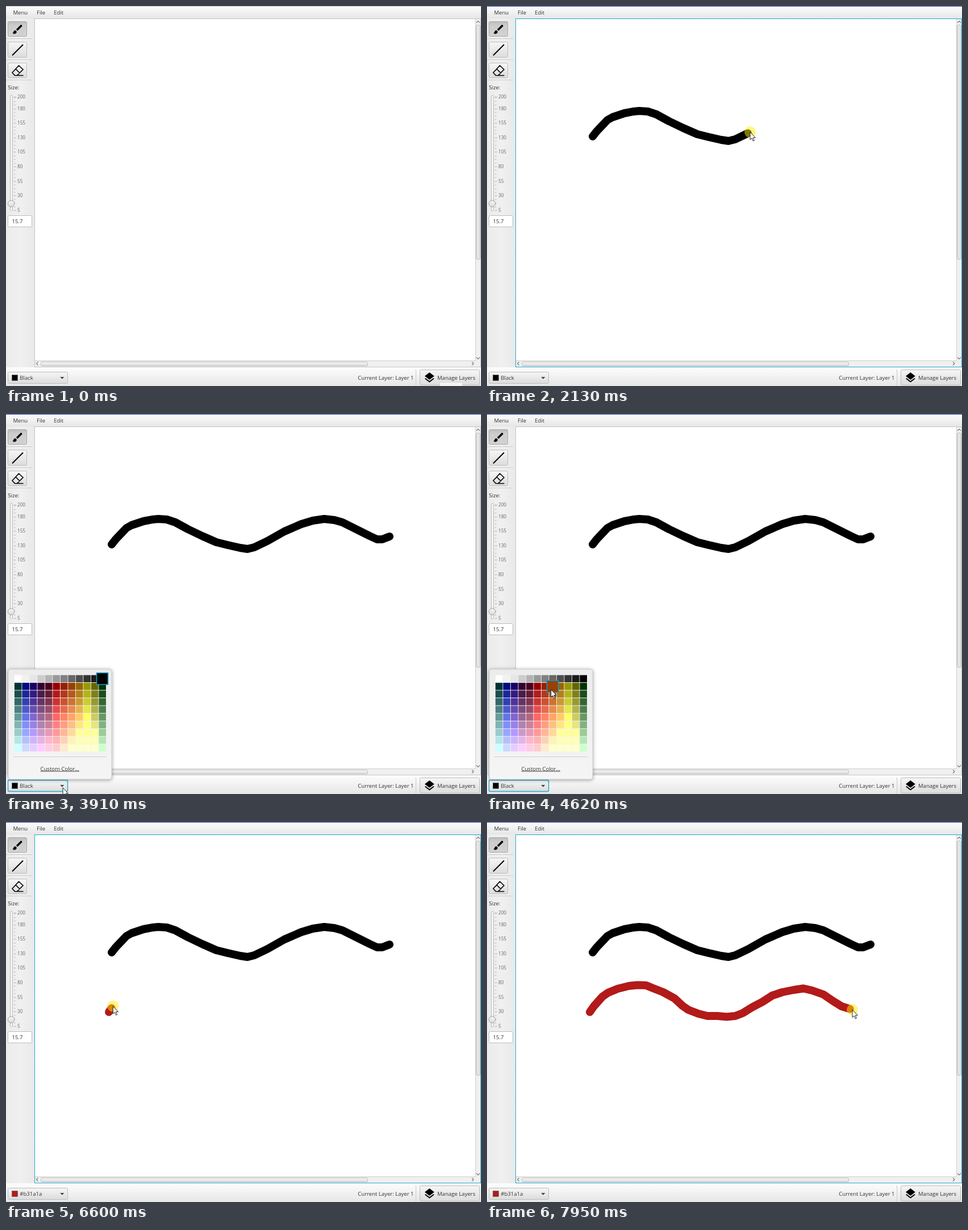
These frames come from a looping animation (836x670 px, 7.99 s). An HTML page:

```html
<!DOCTYPE html>
<html lang="en">
<head>
<meta charset="utf-8">
<title>Paint app</title>
<style>
html, body { margin: 0; width: 100%; height: 100%; overflow: hidden; background: #fff; }
svg { display: block; width: 836px; height: 670px; }
text { font: 9.55px "Open Sans", "Noto Sans", sans-serif; fill: #333; }
.tick text { font-size: 8.2px; fill: #666; }
.tick path { stroke: #b4b4b4; }
.edge { stroke: #bcbcbc; }
.line { stroke: #cdcdcd; fill: none; }
.focus { stroke: #22a9d0; fill: none; }
.arrow { fill: none; stroke: #777; stroke-width: 1.1; }
.stroke { fill: none; stroke-width: 14; stroke-linecap: round; stroke-linejoin: round; }
</style>
</head>
<body>
<svg viewBox="0 0 836 670">
  <defs>
    <linearGradient id="bar" x2="0" y2="1"><stop stop-color="#fdfdfd"/><stop offset="1" stop-color="#e6e6e6"/></linearGradient>
    <linearGradient id="side"><stop stop-color="#ebebeb"/><stop offset=".5" stop-color="#f0f0f0"/><stop offset="1" stop-color="#e9e9e9"/></linearGradient>
    <linearGradient id="btn" x2="0" y2="1"><stop stop-color="#f6f6f6"/><stop offset="1" stop-color="#dcdcdc"/></linearGradient>
    <linearGradient id="down" x2="0" y2="1"><stop stop-color="#bdbdbd"/><stop offset=".3" stop-color="#cdcdcd"/><stop offset="1" stop-color="#d2d2d2"/></linearGradient>
    <linearGradient id="pop" x2="0" y2="1"><stop stop-color="#ececec"/><stop offset="1" stop-color="#f5f5f5"/></linearGradient>
    <filter id="shadow" x="-10%" y="-10%" width="120%" height="120%"><feDropShadow dx="0" dy="1" stdDeviation="3" flood-opacity=".4"/></filter>
  </defs>

  <rect width="836" height="670" fill="#f0f0f0"/>
  <rect width="836" height="22" fill="url(#bar)"/>
  <path id="top" d="M0 .5H836"/>
  <text x="12.5" y="15.3">Menu</text><text x="54" y="15.3">File</text><text x="84.3" y="15.3">Edit</text>

  <rect y="22" width="50" height="615" fill="url(#side)"/>
  <path class="line" d="M0 57.5H46M0 94.5H46M0 130.5H46"/>
  <g class="edge" fill="url(#btn)">
    <rect x="3.5" y="27.5" width="33" height="26" rx="2" fill="url(#down)" stroke="#a8a8a8"/>
    <rect x="3.5" y="63.5" width="33" height="27" rx="2"/>
    <rect x="3.5" y="100.5" width="33" height="26" rx="2"/>
  </g>
  <path transform="translate(9.7 30.3) scale(.9)" d="M7 14c-1.66 0-3 1.34-3 3 0 1.31-1.16 2-2 2 .92 1.22 2.49 2 4 2 2.21 0 4-1.79 4-4 0-1.66-1.34-3-3-3zm13.71-9.37l-1.34-1.34c-.39-.39-1.02-.39-1.41 0L9 12.25 11.75 15l8.96-8.96c.39-.39.39-1.02 0-1.41z"/>
  <path d="M11 87L30 68" stroke="#000" stroke-width="2"/>
  <path d="M22.5 105L30 112L19.5 122.5H15.5L11 117.5ZM16.5 110.5L24.5 118.5M19 122.5H30.5" fill="none" stroke="#000" stroke-width="1.7" stroke-linejoin="round"/>

  <text x="3.3" y="147.3">Size:</text>
  <g id="scale" class="tick"></g>
  <rect x="7.5" y="157.5" width="4" height="204" rx="2" fill="#f4f4f4" class="edge"/>
  <circle cx="9" cy="348.5" r="5.7" fill="url(#btn)" stroke="#9c9c9c"/>
  <rect x="3.5" y="369.5" width="42" height="20" rx="2" fill="#fff" class="edge"/>
  <text x="10.5" y="383.3">15.7</text>

  <rect x="51" y="23" width="775" height="602" fill="#fff"/>
  <path class="line" d="M826.5 23V625.5H51"/>
  <g fill="url(#btn)" class="edge">
    <rect x="827.5" y="33.5" width="7" height="413" rx="2" fill="#e4e4e4"/>
    <rect x="61.5" y="627.5" width="575" height="7" rx="2"/>
  </g>
  <path class="arrow" d="M828 29.5l3-3 3 3M828 619.5l3 3 3-3M56.5 627.5l-3 3 3 3M820 627.5l3 3-3 3"/>
  <rect x="50.5" y="22.5" width="785" height="614" fill="none" stroke="#c4c4c4"/>
  <rect id="canvasFocus" class="focus" x="50.5" y="22.5" width="785" height="614"/>

  <path id="black" class="stroke" stroke="#000"/>
  <path id="red" class="stroke" stroke="#b31a1a"/>

  <rect y="637" width="836" height="33" fill="url(#bar)"/>
  <rect x="3.5" y="645.5" width="105" height="20" rx="2" fill="url(#btn)" class="edge"/>
  <rect id="comboFocus" class="focus" x="3.5" y="645.5" width="105" height="20" rx="2" stroke-width="1.4"/>
  <rect id="chip" x="10.5" y="650.5" width="10" height="10" stroke="#555" stroke-width=".6"/>
  <text id="label" x="24.3" y="659.2"></text>
  <path d="M95.2 654h7.2l-3.6 3.8z" fill="#444"/>
  <text x="619.3" y="659.2">Current Layer: Layer 1</text>
  <path class="line" d="M721.5 641V669"/>
  <rect x="728.5" y="641.5" width="105" height="27" rx="2" fill="url(#btn)" class="edge"/>
  <path transform="translate(734.2 644.1) scale(.93)" d="M11.99 18.54l-7.37-5.73L3 14.07l9 7 9-7-1.63-1.27zM12 16l7.36-5.73L21 9l-9-7-9 7 1.63 1.27z"/>
  <text x="759" y="659.2">Manage Layers</text>
  <rect id="tip" x="763.5" y="663.5" width="40" height="9" fill="#f4f4f4" stroke="#dadada"/>

  <g id="popup">
    <rect x="4" y="450" width="182" height="194" rx="4" fill="url(#pop)" stroke="#bbb" stroke-width=".7" filter="url(#shadow)"/>
    <g id="swatches"></g>
    <path class="line" d="M13 604.5H177"/>
    <text x="94.7" y="628.5" text-anchor="middle" text-decoration="underline">Custom Color...</text>
    <rect id="hover" width="20" height="20.5" stroke="#1496c0" stroke-width="1.6"/>
  </g>

  <circle id="brush" r="7"/>
  <circle id="press" r="10" fill="#fff000" fill-opacity=".5"/>
  <path id="cursor" d="M0 0V13.5L3 10.8L5.3 15.8L7.4 14.9L5.1 10H9.4Z" fill="#fff" stroke="#000" stroke-width=".85"/>
</svg>
<script>
const $ = id => document.getElementById(id);
const LOOP = 7990, RED = '#b31a1a';
const PRESS_1 = 1120, RELEASE_1 = 2760, OPEN = 3910, PICK = 5630, PRESS_2 = 6440;
const COL = 13.5, ROW = 13.55, LEFT = 14.5, TOP = 460;

// Slider scale
const valueY = v => Math.round(360 - (v - 5) * 1.0256) + .5;
let ticks = '';
for (let v = 5; v < 200; v += 6.25) ticks += `<path d="M14 ${valueY(v)}h2.5"/>`;
for (const v of [5, 30, 55, 80, 105, 130, 155, 180, 200])
  ticks += `<path d="M13.5 ${valueY(v)}h4.5"/><text x="20" y="${valueY(v) + 2.8}">${v}</text>`;
$('scale').innerHTML = ticks;

// Palette: a grey row, then base hues brightened row by row
const hues = [[0, 51, 51], [0, 13, 128], [26, 0, 104], [51, 0, 51], [77, 0, 26], [153, 0, 0],
  [153, 30, 0], [153, 64, 0], [153, 102, 0], [153, 153, 0], [102, 102, 0], [0, 51, 0]];
const greys = [255, 242, 230, 204, 179, 153, 128, 102, 77, 51, 26, 0];
const swatch = (c, r) => {
  const rgb = r ? hues[c].map(v => Math.min(255, Math.round(v + 25.5 * (r - 1)))) : Array(3).fill(greys[c]);
  return `rgb(${rgb})`;
};
let cells = '';
for (let r = 0; r < 10; r++)
  for (let c = 0; c < 12; c++)
    cells += `<rect x="${LEFT + c * COL + .4}" y="${TOP + r * ROW + .4}" width="12.6" height="12.6" fill="${swatch(c, r)}"/>`;
$('swatches').innerHTML = cells;

// Brush strokes, drawn at constant speed from start to end
const strokes = [
  { el: $('black'), press: PRESS_1, start: 1366, end: 2701, release: RELEASE_1,
    d: 'M186 230 193 221 212 201 221 196 242 189 258 186 268 185 283 186 298 191 320 203 345 215 370 226 390 231 412 236 425 238 437 235 460 224 490 207 520 194 540 188 560 185 578 187 592 191 610 200 640 215 653 221 662 221 675 216' },
  { el: $('red'), press: PRESS_2, start: 6567, end: 7950, release: 9e3,
    d: 'M181 335 188 325 203 308 213 301 230 294 250 289 265 287.5 280 288 292 293 310 300 330 311 344 324 354 331 372 338 388 342 405 342 422 343.5 437 342 450 337 466 327 485 317 502 306 520 300 540 296 557 293.5 572 297 592 304 608 315 624 325 643 331' }
];
for (const s of strokes) {
  s.el.setAttribute('d', s.d);
  s.len = s.el.getTotalLength();
}

// Cursor moves between strokes: [time, x, y, easing towards this point]
const smooth = f => f * f * (3 - 2 * f);
const easeOut = f => f * (2 - f);
const track = [
  [50, 785, 672], [890, 191.5, 230], [960, 186, 230], [RELEASE_1, 675, 216],
  [3715, 100, 659, easeOut], [3990, 100, 659], [4690, 113, 481], [4980, 88, 484.5],
  [5120, 88, 484.5], [5220, 87, 491.5], [5690, 87, 491.5], [6200, 209, 291], [PRESS_2, 181, 335]
];

const clamp = f => Math.max(0, Math.min(1, f));
const travelled = (s, t) => clamp((t - s.start) / (s.end - s.start)) * s.len;

function cursorAt(t) {
  const s = strokes.find(s => t >= s.press && t < s.release);
  if (s) {
    const p = s.el.getPointAtLength(travelled(s, t));
    return [p.x, p.y];
  }
  const i = Math.max(1, track.findIndex(k => k[0] > t));
  const [t0, x0, y0] = track[i - 1], [t1, x1, y1, ease = smooth] = track[i];
  const f = ease(clamp((t - t0) / (t1 - t0)));
  return [x0 + (x1 - x0) * f, y0 + (y1 - y0) * f];
}

const show = (id, on) => $(id).style.display = on ? '' : 'none';
const set = (id, attrs) => { for (const k in attrs) $(id).setAttribute(k, attrs[k]); };

function draw(t) {
  const [x, y] = cursorAt(t);
  const at = `translate(${x} ${y})`;
  const active = t >= PRESS_1, open = t >= OPEN && t < PICK, picked = t >= PICK;
  const drawing = strokes.some(s => t >= s.press && t < s.release);
  const color = picked ? RED : '#000';

  set('top', { stroke: active ? '#2b48b4' : '#c4c4c4' });
  show('tip', t < 50);
  show('canvasFocus', active && t < OPEN || t >= PRESS_2);
  show('comboFocus', t >= OPEN && t < PRESS_2);
  set('chip', { fill: color });
  $('label').textContent = picked ? RED : 'Black';

  for (const s of strokes) {
    const done = t >= s.release ? s.len : Math.max(.01, travelled(s, t) - 4.5);
    s.el.style.display = t >= s.press ? '' : 'none';
    s.el.setAttribute('stroke-dasharray', `${done} 2000`);
  }

  show('popup', open);
  if (open) {
    let c = Math.floor((x - LEFT) / COL), r = Math.floor((y - TOP) / ROW);
    if (c < 0 || c > 11 || r < 0 || r > 9) [c, r] = [11, 0];
    set('hover', { x: LEFT + c * COL - 3.5, y: TOP + r * ROW - 3.5, fill: swatch(c, r) });
  }

  show('brush', !drawing && !open && x > 51 && x < 826 && y > 23 && y < 625);
  set('brush', { transform: at, fill: color });
  show('press', drawing || t >= 3770 && t < OPEN || t >= 5560 && t < PICK);
  set('press', { transform: at });
  set('cursor', { transform: at });
}

const begin = performance.now();
function frame() {
  draw((performance.now() - begin) % LOOP);
  requestAnimationFrame(frame);
}
frame();
</script>
</body>
</html>
```
